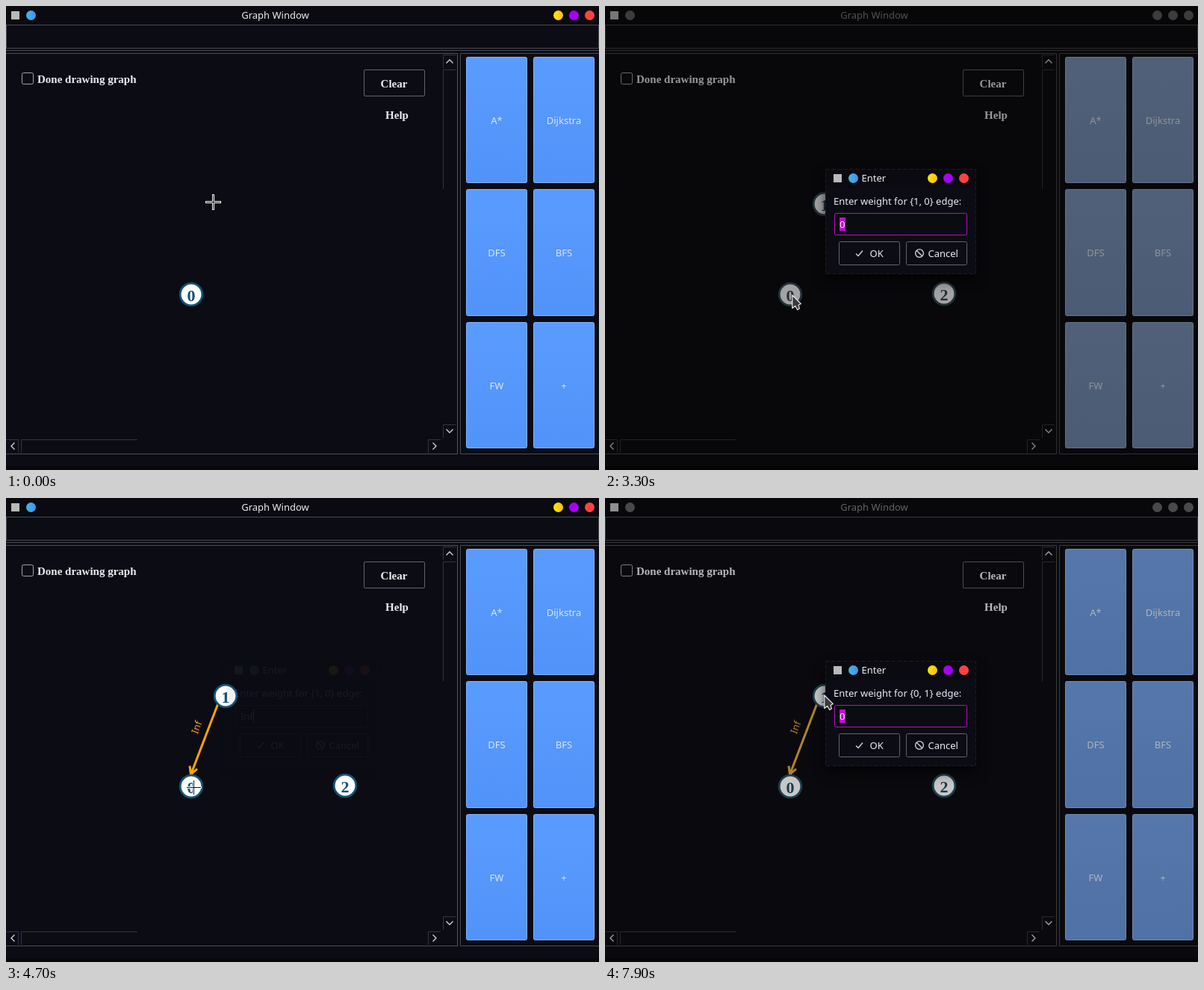
Recreate the animation shown at these times as an HTML page. Size 794x621 px, loop 8000 ms.

```html
<!DOCTYPE html>
<html lang="en">
<head>
<meta charset="utf-8">
<title>Graph Window</title>
<style>
html, body { margin: 0; width: 100%; height: 100%; overflow: hidden; background: #0c0c14; }
svg { position: absolute; left: 0; top: 0; width: 794px; height: 621px; }
text { font: 13px "Noto Sans", "Open Sans", sans-serif; fill: #ececf0; white-space: pre; }
.serif text, .node text { font: bold 15px "Liberation Serif", "Noto Serif", serif; }
.mid text, text.mid { text-anchor: middle; }
.line { fill: none; stroke: #4b4b54; }
.bar { fill: none; stroke: #34344a; }
.box { fill: none; stroke: #64646c; }
.icon { fill: none; stroke: #d8d8dc; stroke-width: 1.3; }
.algo rect { fill: url(#blue); stroke: #86b4ff; }
.algo text { fill: #dde6f4; }
.node circle { fill: #fff; stroke: #115474; stroke-width: 2.8; }
.node text { font-size: 22px; fill: #154f6e; text-anchor: middle; }
.edge path { fill: none; stroke: #ffa500; stroke-width: 3; }
.edge text { fill: #ffa500; }

/* every change is a hard step on one 8 s clock */
.win, .act, .inact, .n1, .n2, .edge, .dialog, .first, .second,
.zero, .typed, .typed tspan, .caret, .cross, .arrow { animation: 8s step-end infinite; }

.win { animation-name: dim; }
@keyframes dim {
  0%, 58.75% { filter: none; }
  41.25% { filter: saturate(.38) brightness(.64); }
  56.25%, 98.75%, 100% { filter: saturate(.66) brightness(.78); }
}
.act { animation-name: active; }
@keyframes active { 0%, 56.25% { opacity: 1; } 41.25%, 98.75%, 100% { opacity: 0; } }
.inact { animation-name: inactive; }
@keyframes inactive { 0%, 56.25% { opacity: 0; } 41.25%, 98.75%, 100% { opacity: 1; } }

.n1 { animation-name: n1; }
@keyframes n1 { 0% { opacity: 0; } 5%, 100% { opacity: 1; } }
.n2 { animation-name: n2; }
@keyframes n2 { 0% { opacity: 0; } 13.75%, 100% { opacity: 1; } }
.edge { animation-name: edge; }
@keyframes edge { 0% { opacity: 0; } 56.25%, 100% { opacity: 1; } }

.dialog { animation-name: dialog; }
@keyframes dialog {
  0%, 62.5% { opacity: 0; }
  41.25%, 98.75%, 100% { opacity: 1; }
  56.25% { opacity: .42; }
  58.75% { opacity: .06; }
}
.first { animation-name: first; }
@keyframes first { 0% { opacity: 1; } 62.5%, 100% { opacity: 0; } }
.second { animation-name: second; }
@keyframes second { 0% { opacity: 0; } 62.5%, 100% { opacity: 1; } }
.zero { animation-name: zero; }
@keyframes zero { 0%, 62.5%, 100% { opacity: 1; } 50% { opacity: 0; } }
.typed { animation-name: typed; }
@keyframes typed { 0%, 62.5%, 100% { opacity: 0; } 50% { opacity: 1; } }
.typed tspan { animation-name: letter; }
@keyframes letter { 0% { fill: transparent; } 52.5%, 100% { fill: #ececf0; } }
.caret { animation-name: caret; }
@keyframes caret {
  0%, 62.5%, 100% { opacity: 0; transform: translateX(322px); }
  47.5% { opacity: 1; transform: translateX(322px); }
  50% { opacity: 1; transform: translateX(326px); }
  52.5% { opacity: 1; transform: translateX(331px); }
}

.cross { animation-name: cross; }
@keyframes cross {
  0% { opacity: 1; transform: translate(277px, 262px); }
  1.25% { transform: translate(277px, 252px); }
  2.5% { transform: translate(277px, 248px); }
  6.25% { transform: translate(290px, 260px); }
  7.5% { transform: translate(345px, 300px); }
  8.75% { transform: translate(395px, 338px); }
  10% { transform: translate(428px, 362px); }
  11.25% { transform: translate(437px, 368px); }
  15% { transform: translate(440px, 380px); }
  16.25% { transform: translate(437px, 391px); }
  17.5% { transform: translate(405px, 372px); }
  18.75% { transform: translate(355px, 325px); }
  20% { transform: translate(312px, 286px); }
  21.25% { transform: translate(296px, 273px); }
  22.5% { transform: translate(300px, 270px); }
  30% { transform: translate(288px, 305px); }
  31.25% { transform: translate(271px, 348px); }
  41.25% { opacity: 0; transform: translate(271px, 348px); }
  56.25% { opacity: 1; transform: translate(251px, 387px); }
  62.5% { transform: translate(252px, 307px); }
  65% { transform: translate(249px, 271px); }
  67.5% { transform: translate(280px, 306px); }
  71.25% { transform: translate(268px, 379px); }
  73.75% { transform: translate(245px, 382px); }
  77.5% { transform: translate(243px, 384px); }
  83.75% { transform: translate(267px, 332px); }
  87.5% { transform: translate(288px, 279px); }
  91.25% { transform: translate(300px, 266px); }
  95%, 100% { opacity: 0; transform: translate(300px, 266px); }
}
.arrow { animation-name: arrow; }
@keyframes arrow {
  0%, 56.25% { opacity: 0; transform: translate(250px, 386px); }
  41.25% { opacity: 1; transform: translate(250px, 386px); }
  95%, 100% { opacity: 1; transform: translate(293px, 263px); }
}
</style>
</head>
<body>
<svg class="win" viewBox="0 0 794 621">
  <defs>
    <linearGradient id="blue" x1="0" y1="0" x2="0" y2="1">
      <stop offset="0" stop-color="#599bff"/><stop offset="1" stop-color="#5193f8"/>
    </linearGradient>
    <linearGradient id="sky">
      <stop offset="0" stop-color="#3cbbdc"/><stop offset="1" stop-color="#4a8ff2"/>
    </linearGradient>
    <linearGradient id="gold">
      <stop offset="0" stop-color="#ffe60c"/><stop offset="1" stop-color="#ffc010"/>
    </linearGradient>
    <linearGradient id="plum">
      <stop offset="0" stop-color="#b400f4"/><stop offset="1" stop-color="#9a00f0"/>
    </linearGradient>
    <g id="lights">
      <circle r="6.5" fill="url(#gold)"/>
      <circle cx="21" r="6.5" fill="url(#plum)"/>
      <circle cx="42" r="6.5" fill="#ff4343"/>
    </g>
    <rect id="mark" width="11" height="11" fill="#b9b9b9"/>
  </defs>

  <rect width="794" height="621" fill="#0c0c14"/>
  <rect width="794" height="25" fill="#0a0a10"/>
  <rect y="616" width="794" height="5" fill="#07070c"/>
  <use href="#mark" x="7" y="7"/>
  <g class="act">
    <circle cx="33.5" cy="12.5" r="6.5" fill="url(#sky)"/>
    <text class="mid" x="360.5" y="17">Graph Window</text>
    <use href="#lights" x="739.5" y="12.5"/>
  </g>
  <g class="inact" fill="#5e5e60">
    <circle cx="33.5" cy="12.5" r="6.5"/>
    <text class="mid" x="360.5" y="17" style="fill:#808084">Graph Window</text>
    <circle cx="739.5" cy="12.5" r="6.5"/>
    <circle cx="760.5" cy="12.5" r="6.5"/>
    <circle cx="781.5" cy="12.5" r="6.5"/>
  </g>

  <rect class="line" x=".5" y="25.5" width="793" height="31"/>
  <path class="line" d="M0 59.5H794M0 63.5H605M0 599.5H605M794 63.5H608.5V599.5H794"/>
  <path class="line inact" d="M604.5 64V599"/>
  <path class="act" d="M604.5 64V600" stroke="#b512c0"/>

  <path class="bar" d="M602 65.5H585.5V83M602 85.5H585.5V245M602 560.5H585.5V578
    M0 580.5H16.5V598M20.5 598V580.5H176M565.5 598V580.5H582"/>
  <path class="icon" d="M589.5 76.5L594 72L598.5 76.5M589.5 566.5L594 571L598.5 566.5
    M11.5 584.5L7 589L11.5 593.5M571.5 584.5L576 589L571.5 593.5"/>

  <g class="serif">
    <rect x="21.5" y="89.5" width="15" height="15" rx="2" fill="none" stroke="#a4a4a8"/>
    <text x="42" y="103">Done drawing graph</text>
    <rect class="box" x="479.5" y="85.5" width="81" height="35" rx="1.5"/>
    <g class="mid"><text x="519.5" y="109">Clear</text><text x="523.5" y="151">Help</text></g>
  </g>

  <g class="algo mid" id="algo"></g>

  <g class="edge">
    <path d="M284 275L247.5 370M246 358.5L247.5 370L256 362.5"/>
    <text class="mid" transform="translate(259.5 308.5) rotate(-69)">Inf</text>
  </g>
  <g class="node" transform="translate(248 386)"><circle r="14.8"/><text y="8.5">0</text></g>
  <g class="n1"><g class="node" transform="translate(294 265)"><circle r="14.8"/><text y="8.5">1</text></g></g>
  <g class="n2"><g class="node" transform="translate(454 385)"><circle r="14.8"/><text y="8.5">2</text></g></g>
</svg>

<svg viewBox="0 0 794 621">
  <g class="dialog">
    <rect x="295" y="218" width="202" height="141" fill="#0c0c14" style="filter:drop-shadow(0 8px 8px #000a)"/>
    <rect x="295" y="218" width="202" height="25" fill="#0a0a10"/>
    <rect x="295.5" y="218.5" width="201" height="140" fill="none" stroke="#1d1d26" stroke-dasharray="5 3"/>
    <use href="#mark" x="306" y="225"/>
    <circle cx="332.5" cy="230.5" r="6.5" fill="url(#sky)"/>
    <text x="343.5" y="235">Enter</text>
    <use href="#lights" x="438.5" y="230.5"/>
    <text class="first" x="306" y="266">Enter weight for {1, 0} edge:</text>
    <text class="second" x="306" y="266">Enter weight for {0, 1} edge:</text>
    <rect x="307.5" y="277.5" width="177" height="29" rx="2" fill="#0b0b12" stroke="#b512c0"/>
    <g class="zero">
      <rect x="314" y="283" width="8" height="18" fill="#bd10cc"/>
      <text x="314" y="297">0</text>
    </g>
    <text class="typed" x="314" y="297">In<tspan>f</tspan></text>
    <rect class="caret" y="283" width="1" height="18" fill="#ececf0"/>
    <rect class="box" x="313.5" y="315.5" width="81" height="31" rx="2"/>
    <rect class="box" x="403.5" y="315.5" width="81" height="31" rx="2"/>
    <path class="icon" d="M336 331.5L339 334.5L345 327.5"/>
    <circle class="icon" cx="421" cy="331" r="5.4"/>
    <path class="icon" d="M417.2 327.2L424.8 334.8"/>
    <text x="354.5" y="336">OK</text>
    <text x="432.5" y="336">Cancel</text>
  </g>

  <g class="cross">
    <path d="M-10 .5H11M.5 -10V11" stroke="#fff" stroke-width="3"/>
    <path d="M-9 .5H10M.5 -9V10" stroke="#15151a"/>
  </g>
  <path class="arrow" d="M.8 1V18.5L4.8 15.4L7.6 20.6L10.4 19L9 14.2L12.4 12.6Z"
    fill="#3a3a3c" stroke="#f4f4f4" stroke-width="1.1" stroke-linejoin="round"/>
</svg>

<script>
const names = ["A*", "Dijkstra", "DFS", "BFS", "FW", "+"];
const rows = [[68, 169], [245, 170], [423, 169]];
document.getElementById("algo").innerHTML = names.map((name, i) => {
  const x = 616 + (i % 2) * 90;
  const [y, h] = rows[i >> 1];
  return `<rect x="${x + .5}" y="${y + .5}" width="81" height="${h - 1}" rx="2"/>` +
    `<text x="${x + 41}" y="${y + 90}">${name}</text>`;
}).join("");
</script>
</body>
</html>
```
